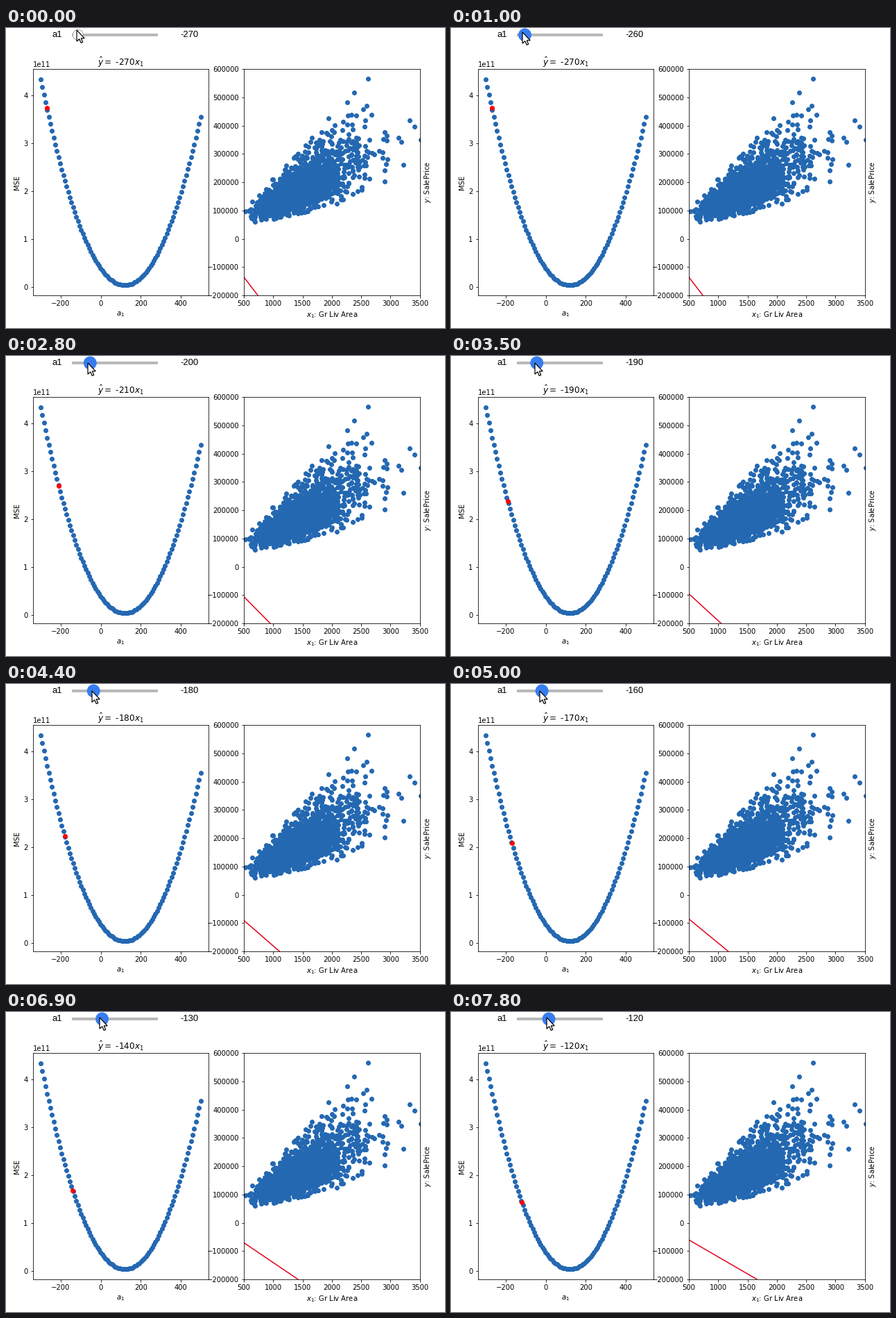
A matplotlib script that plays this animation: 633 px wide and 432 px high, repeating every 8000 ms.

```python
import matplotlib.pyplot as plt
import numpy as np
from matplotlib.animation import FuncAnimation
from matplotlib.patches import Circle, Polygon

W, H, DPI = 633, 432, 72
FRAMES, INTERVAL = 80, 100
BLUE, RED, LINE_RED = "#2468b2", "#ff0000", "#e2001a"
THUMB_BLUE, TRACK_GREY = "#377df0", "#b9b9b9"
PRESS_FRAME = 5
UNIT_PX = 0.2467  # slider pixels per unit of a1

ARROW = np.array([(0, 0), (0, 16.2), (3.7, 12.8), (6.2, 18.4), (8.7, 17.4),
                  (6.3, 11.9), (11.2, 11.9)])


def drag(frame):
    """Hand position along the slider, in units of a1."""
    return np.interp(frame, [0, 10, 20, 28, 34, 43, 50, 55, 69, 80],
                     [-270, -265, -235, -205, -195, -185, -165, -145, -135, -121])


def snapped(frame):
    """Slider value: the drag rounded to steps of ten."""
    return int(np.floor((drag(frame) + 5) / 10) * 10)


def slider_x(a):
    return 104 + UNIT_PX * (a + 270)


def pointer_tip(frame):
    height = np.interp(frame, [0, 1, 10, 30, 50, 60], [3, 6, 6, 10, 10, 8])
    return np.round([slider_x(drag(frame)) - 2, height])


def mse(a):
    return 0.03e11 + 2.442e6 * (a - 120.1) ** 2


def houses(count=1750):
    """Log-normal areas; prices fan out around a straight trend."""
    rng = np.random.default_rng(5)
    area = rng.lognormal(np.log(1400), 0.3, count)
    noise = np.clip(rng.normal(0, 1, count), -2.7, 2.5)
    sigma = np.interp(area, [600, 2000], [0.19, 0.26])
    price = (20e3 + 105 * area) * np.exp(sigma * noise)
    return area, price


def panel(left):
    return fig.add_axes([left / W, 46.75 / H, 253.64 / W, 326.16 / H])


plt.rcParams["font.family"] = "DejaVu Sans"
fig = plt.figure(figsize=(W / DPI + 1e-5, H / DPI), dpi=DPI, facecolor="white")

loss_ax = panel(38.6)
slopes = np.linspace(-300, 500, 100)
loss_ax.scatter(slopes, mse(slopes), color=BLUE)
loss_dot = loss_ax.scatter([], [], color=RED, zorder=2)
loss_ax.set(xlim=(-340, 540), ylim=(-0.185e11, 4.556e11),
            xlabel="$a_1$", ylabel="MSE")
title = loss_ax.set_title("")

fit_ax = panel(342.96)
fit_ax.scatter(*houses(), color=BLUE)
areas = np.array([0, 5000])
fit_line, = fit_ax.plot([], [], color=LINE_RED, lw=1.5)
fit_ax.set(xlim=(500, 3500), ylim=(-200000, 600000),
           xlabel="$x_1$: Gr Liv Area", ylabel="$y$: SalePrice")
fit_ax.yaxis.set_label_position("right")

# Slider and pointer live on an overlay measured in pixels.
ui = fig.add_axes([0, 0, 1, 1], zorder=5)
ui.set(xlim=(0, W), ylim=(H, 0))
ui.axis("off")
ui.plot([95, 219], [10, 10], color=TRACK_GREY, lw=4, solid_capstyle="butt")
label_style = dict(family="Liberation Sans", fontsize=13, va="baseline")
ui.text(66, 13.3, "a1", **label_style)
readout = ui.text(251.5, 13.3, "", **label_style)
thumb = ui.add_patch(Circle((104, 10), 9.5, zorder=3))
pointer = ui.add_patch(Polygon(ARROW, fc="white", ec="black", lw=1.2, zorder=4))


def draw(frame):
    value = snapped(frame)
    slope = snapped(frame - 1)  # the plots redraw one frame after the slider
    pressed = frame >= PRESS_FRAME
    readout.set_text(f"{value}")
    thumb.set_center((slider_x(value), 10))
    thumb.set_radius(9.5 if pressed else 7.5)
    thumb.set_facecolor(THUMB_BLUE if pressed else "white")
    thumb.set_edgecolor("none" if pressed else "#a6a6a6")
    pointer.set_xy(ARROW + pointer_tip(frame))
    title.set_text(rf"$\hat{{y}} = $ {slope}$x_1$")
    loss_dot.set_offsets([(slope, mse(slope))])
    fit_line.set_data(areas, slope * areas)
    return readout, thumb, pointer, title, loss_dot, fit_line


anim = FuncAnimation(fig, draw, frames=FRAMES, interval=INTERVAL,
                     repeat=True, repeat_delay=0, blit=False)
plt.show()
```
